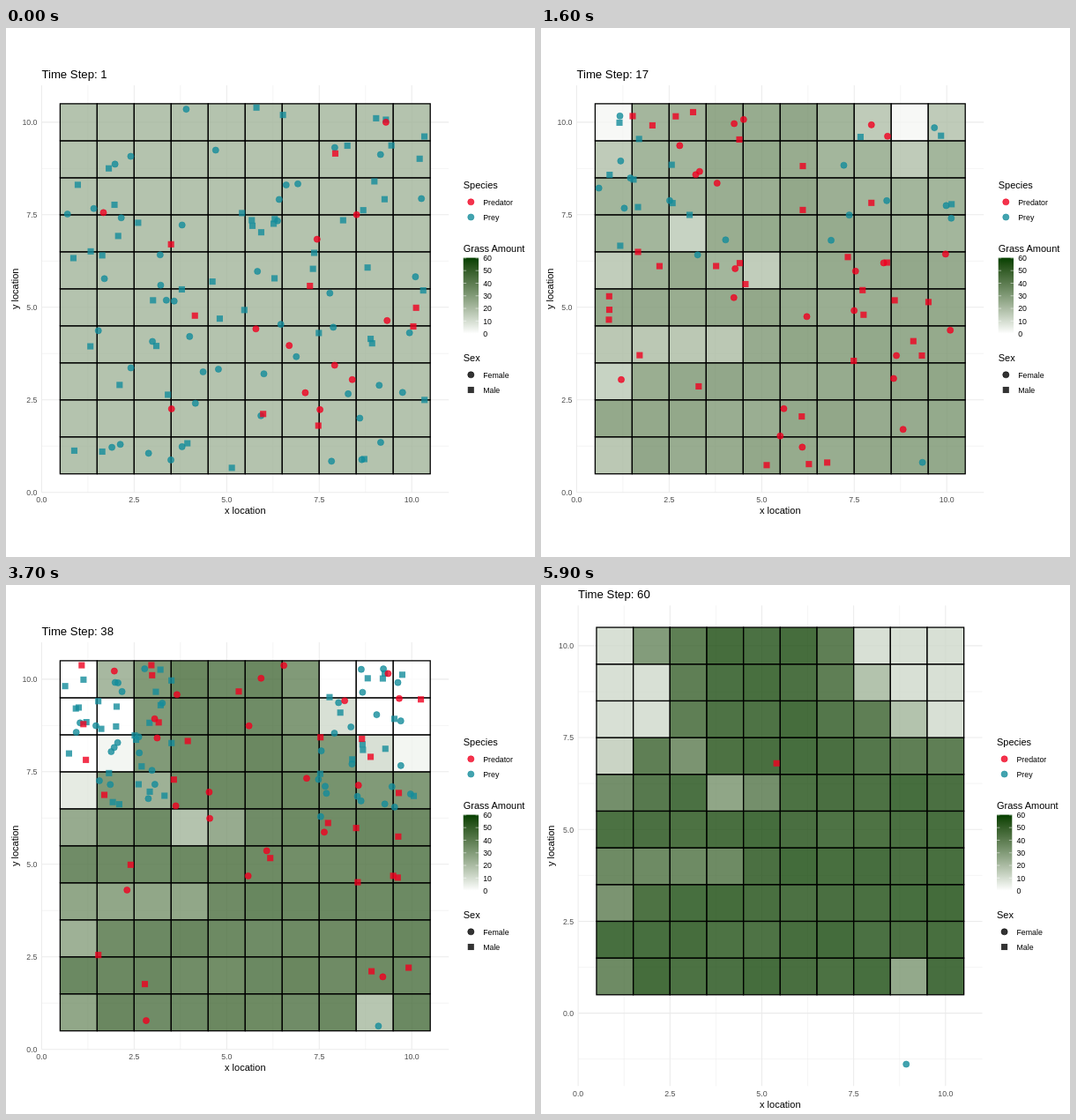
These frames come from a looping animation (600 px wide and 600 px high, 6000 ms). An HTML page:

```html
<!DOCTYPE html>
<html lang="en">
<head>
<meta charset="utf-8">
<title>Predators, prey and grass</title>
<style>
html, body { margin: 0; width: 100%; height: 100%; overflow: hidden; background: #fff; }
svg { display: block; width: 600px; height: 600px; font-family: "Liberation Sans", Arial, Helvetica, sans-serif; }
</style>
</head>
<body>
<svg id="stage" viewBox="0 0 600 600"></svg>
<script>
const STEPS = 60, STEP_MS = 100;
const RED = '#f00020', TEAL = '#148c9b';
const UNIT = 461.8 / 11, CX = 271.3, CY = 295.8;
const stage = document.getElementById('stage');

const rand = n => { const v = Math.sin(n * 12.9898 + 4.1) * 43758.5453; return v - Math.floor(v); };
const clamp = v => Math.min(1, Math.max(0, v));
const mix = (a, b, u) => a + (b - a) * u;
const fold = v => { const m = ((v % 2) + 2) % 2; return Math.min(m, 2 - m); };

// Turning points of the populations
const KEYS = [1, 11, 24, 32, 38, 47, 60];
const PREY = [96, 23, 32, 77, 78, 8, 0];
const HUNTERS = [20, 78, 26, 16, 48, 72, 0];
const REACH = [1, 0.45, 0.3, 0.26, 0.3, 0.33, 0.3];
const DEPTH = [1, 0.55, 0.24, 0.38, 0.42, 0.09, 0.1];
const CROWD = [1, 1, 1.2, 1.4, 2, 1.5, 1.3];
const LONER_X = [9.16, 9.31, 9.38, 8.71, 9.1, 8.62, 8.93];
const LONER_Y = [1.35, 0.63, 1.02, 0.75, 0.63, 0.59, 0.56];

function at(track, step) {
  let i = KEYS.length - 2;
  while (KEYS[i] > step) i--;
  return mix(track[i], track[i + 1], (step - KEYS[i]) / (KEYS[i + 1] - KEYS[i]));
}

// Grass colour: straight line in Lab from white to dark green
function green(amount) {
  const u = amount / 60;
  const fy = (mix(100, 22.5, u) + 16) / 116, fx = fy - 31 * u / 500, fz = fy - 31 * u / 200;
  const lin = f => f > 0.2069 ? f ** 3 : (f - 16 / 116) / 7.787;
  const X = 0.9505 * lin(fx), Y = lin(fy), Z = 1.089 * lin(fz);
  const out = c => Math.round(255 * (c > 0.0031 ? 1.055 * clamp(c) ** (1 / 2.4) - 0.055 : 12.92 * clamp(c)));
  return `rgb(${out(3.2406 * X - 1.5372 * Y - 0.4986 * Z)},${out(-0.9689 * X + 1.8758 * Y + 0.0415 * Z)},${out(0.0557 * X - 0.204 * Y + 1.057 * Z)})`;
}

const full = step => 22 + 0.74 * (step - 1) - 0.0024 * (step - 1) ** 2;

// Grazing spreads from the two upper corners: centre, then the first cell eaten
const CORNERS = [{ x: 0.5, y: 8.7, col: 1 }, { x: 9.7, y: 9.7, col: 9 }];

// Single meals leave a lasting gap: column, row, loss, step
const MEALS = [[4, 6, 24, 20], [5, 6, 15, 8], [3, 7, 17, 8], [1, 6, 15, 8], [1, 3, 17, 8], [1, 1, 13, 7], [9, 1, 25, 24]];
for (let col = 1; col <= 4; col++) MEALS.push([col, 4, 13, 9]);

function grass(col, row, step) {
  let loss = 3 * rand(col * 11 + row) * clamp(step / 15 - 0.1);
  for (const c of CORNERS) {
    const d = Math.hypot(col - c.x, row - c.y);
    const onset = 4 + 7 * (Math.abs(col - c.col) + 10 - row);
    const eaten = clamp((2.18 - d) / 0.45) * clamp((step - onset) / 14) * full(Math.min(step, 38));
    loss = Math.max(loss, eaten, 8 * clamp(3.8 - d) * clamp(step / 20 - 0.1));
  }
  for (const [x, y, size, when] of MEALS)
    if (x === col && y === row) loss = Math.max(loss, size * clamp((step - when + 4) / 4));
  return Math.max(0, full(step) - loss);
}

// Random walk inside the unit square, bouncing off its edges
function walk(id, step) {
  let u = rand(id * 1.7), v = rand(id * 2.3 + 40);
  for (let j = 2; j <= step; j++) {
    u += 0.2 * (rand(id + j * 7.31) - 0.5);
    v += 0.2 * (rand(id + j * 3.17 + 900) - 0.5);
  }
  return [fold(u), fold(v)];
}

const animal = (id, fill, x, y) => ({ fill, round: rand(id + 0.5) < 0.5, x: 0.6 + 9.8 * x, y: 10.4 - 9.8 * y });

function animals(step) {
  const list = [];
  for (let n = 0; n < Math.round(at(PREY, step)); n++) {
    const [u, v] = walk(n, step), x = u * at(REACH, step);
    list.push(animal(n, TEAL, n < 8 || n % 2 ? x : 1 - x, v * at(DEPTH, step)));
  }
  list.push({ fill: TEAL, round: true, x: at(LONER_X, step), y: at(LONER_Y, step) - 0.65 * Math.max(0, step - 57) });
  for (let n = 0; n < Math.round(at(HUNTERS, step)); n++) {
    const [u, v] = walk(n + 500, step);
    list.push(animal(n + 500, RED, u, v ** at(CROWD, step)));
  }
  const left = STEPS - step;
  if (left < 13) list.push({ fill: RED, round: false, x: 5.4 + Math.sin(left * 0.9), y: 6.8 + 0.7 * Math.sin(left * 0.6) });
  return list;
}

const text = (x, y, size, str, more = '') => `<text x="${x}" y="${y}" font-size="${size}" ${more}>${str}</text>`;
const line = (x1, y1, x2, y2, w, stroke = '#ebebeb') =>
  `<line x1="${x1}" y1="${y1}" x2="${x2}" y2="${y2}" stroke="${stroke}" stroke-width="${w}"/>`;
const mark = (x, y, fill, round) => round
  ? `<circle cx="${x}" cy="${y}" r="3.55" fill="${fill}" fill-opacity=".8" stroke="${fill}" stroke-opacity=".8" stroke-width=".7"/>`
  : `<rect x="${x - 3.55}" y="${y - 3.55}" width="7.1" height="7.1" fill="${fill}" fill-opacity=".8"/>`;

let stops = '';
for (let k = 0; k <= 12; k++) stops += `<stop offset="${k / 12}" stop-color="${green(60 - 5 * k)}"/>`;
const DEFS = `<defs><linearGradient id="bar" x1="0" y1="0" x2="0" y2="1">${stops}</linearGradient></defs>`;

function legend(x) {
  const key = (y, fill, round, label) => mark(x + 8.6, y, fill, round) + text(x + 22.5, y + 3.3, 8.8, label);
  let out = text(x, 182, 11, 'Species') + key(197.3, RED, true, 'Predator') + key(214.5, TEAL, true, 'Prey');
  out += text(x, 254, 11, 'Grass Amount') + `<rect x="${x}" y="260.6" width="17.3" height="86.2" fill="url(#bar)"/>`;
  for (let k = 0; k <= 6; k++) {
    const y = 346.6 - k * 14.28;
    out += line(x, y, x + 3.4, y, 0.5, '#fff') + line(x + 13.9, y, x + 17.3, y, 0.5, '#fff');
    out += text(x + 22.5, y + 3.2, 8.8, k * 10);
  }
  return out + text(x, 378, 11, 'Sex') + key(393.3, '#000', true, 'Female') + key(410.5, '#000', false, 'Male');
}

// The panel grows downwards as soon as an animal leaves the field
function draw(step) {
  const list = animals(step);
  const low = Math.min(0.5, ...list.map(a => a.y));
  const pad = (10.5 - low) * 0.05, height = 10.5 - low + 2 * pad;
  const unit = Math.min(UNIT, 545 / height);
  const left = CX - 5.5 * unit, right = CX + 5.5 * unit;
  const top = CY - height * unit / 2, bottom = CY + height * unit / 2;
  const px = v => left + v * unit, py = v => top + (10.5 + pad - v) * unit;

  let out = DEFS, labels = '';
  for (let k = -1; k <= 8; k++) {
    const v = k * 1.25, major = k % 2 === 0, w = major ? 1.07 : 0.53;
    if (k >= 0) out += line(px(v), top, px(v), bottom, w);
    if (v >= low - pad - 1e-6) out += line(left, py(v), right, py(v), w);
    if (major) {
      labels += text(px(v), bottom + 11.3, 8.8, v.toFixed(1), 'text-anchor="middle" fill="#4d4d4d"');
      labels += text(left - 4.9, py(v) + 3.4, 8.8, v.toFixed(1), 'text-anchor="end" fill="#4d4d4d"');
    }
  }

  for (let col = 1; col <= 10; col++) for (let row = 1; row <= 10; row++)
    out += `<rect x="${px(col - 0.5)}" y="${py(row + 0.5)}" width="${unit}" height="${unit}" fill="${green(grass(col, row, step))}" fill-opacity=".8" stroke="#000" stroke-width="1.3"/>`;
  for (const a of list) out += mark(px(a.x), py(a.y), a.fill, a.round);

  out += labels + text(left, top - 8, 13.2, 'Time Step: ' + step);
  out += text(CX, bottom + 24.4, 11, 'x location', 'text-anchor="middle"');
  out += text(0, 0, 11, 'y location', `text-anchor="middle" transform="translate(${left - 26.7} ${CY}) rotate(-90)"`);
  stage.innerHTML = out + legend(right + 16.5);
}

const start = performance.now();
let shown = 0;
function tick() {
  const step = Math.floor((performance.now() - start) / STEP_MS) % STEPS + 1;
  if (step !== shown) draw(shown = step);
  requestAnimationFrame(tick);
}
tick();
</script>
</body>
</html>
```
